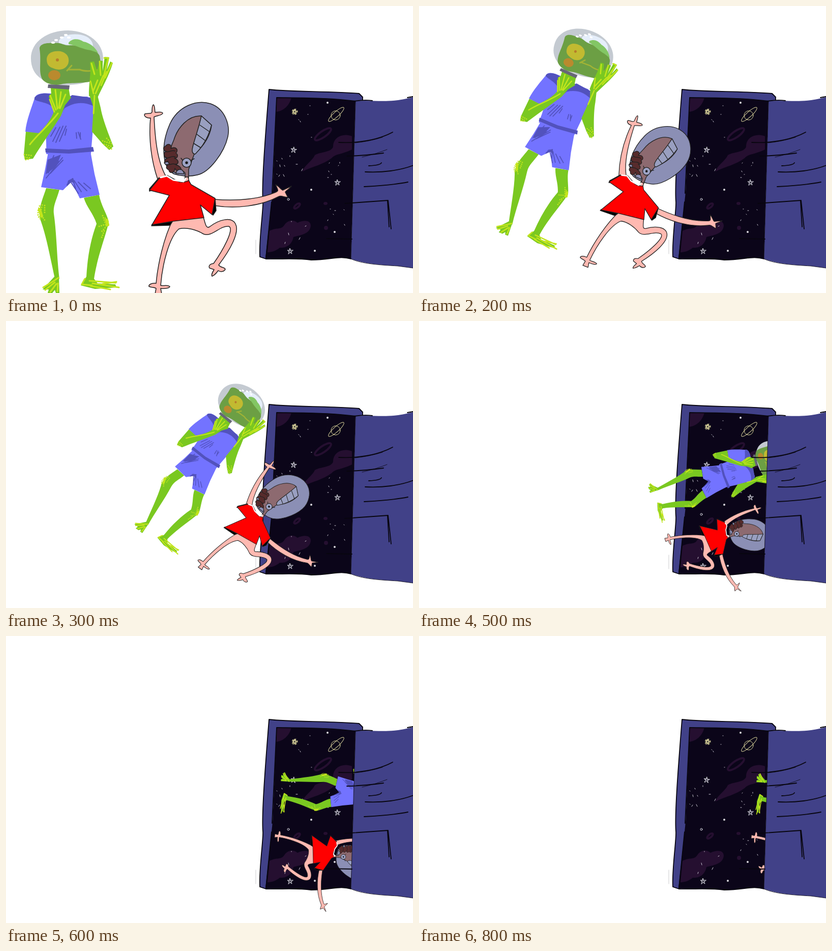
Write an HTML page that moves like this. It is 800 by 564 pixels and loops after 1000 ms.

```html
<!DOCTYPE html>
<html lang="en">
<head>
<meta charset="utf-8">
<title>Through the space door</title>
<style>
  html, body { margin: 0; width: 100%; height: 100%; overflow: hidden; background: #fff; }
  svg { display: block; width: 800px; height: 564px; }
  path, ellipse, circle { stroke-linecap: round; stroke-linejoin: round; }
  .line { fill: none; stroke: #08060f; stroke-width: 1.8; }
  .thin { stroke-width: .8; }
  .navy { fill: #414188; }
  .nebula { fill: #250f30; }
  .ring { fill: none; stroke: #250f30; stroke-width: 4; }
  .specks { fill: none; stroke: #cfcbd6; stroke-width: 1; }
  .star { fill: none; stroke: #dcdce4; stroke-width: 1; }
  .gold { stroke: #d8d29a; }
  .green { fill: #7ac821; }
  .lime { fill: none; stroke: #c3e51c; stroke-width: 3; }
  .dots { stroke-dasharray: 0 4.5; }
  .blue { fill: #7373ff; }
  .shade { fill: #5252bd; }
  .hatch { fill: none; stroke: #5252bd; stroke-width: 2; }
  #man > * { stroke: #222; stroke-width: 1.5; }
  .skin { fill: #ffb9b1; }
  .ink { fill: #000; }
  .open { fill: none; }
</style>
</head>
<body>
<svg viewBox="0 0 800 564">
  <defs>
    <path id="scribble" d="M-4 5L-1-6L3 5L-6-2L5-2Z"/>
    <clipPath id="outside"><path d="M0 0H687V187L678 497V564H0Z"/></clipPath>
  </defs>

  <g id="portal">
    <path class="navy" d="M517 164C560 169 640 167 694 172L701 179V185L687 190L532 184L524 372L511 497L499 493C497 460 506 400 505 385C502 350 511 240 517 164Z"/>
    <path fill="#0b0519" d="M532 180C580 182 620 178 687 187L678 497C655 490 640 499 600 499C570 495 540 498 510 496L522 385L524 365Z"/>
    <path class="nebula" d="M532 180H561C557 196 545 207 530 208Z"/>
    <path class="nebula" d="M583 325C585 314 603 304 607 293C620 286 638 288 643 277C642 256 666 249 680 256V282C660 292 648 290 640 299C622 312 604 315 583 325Z"/>
    <path class="nebula" d="M514 484L518 442C530 435 540 440 546 432C553 420 565 419 573 426C586 420 599 421 599 432C597 448 580 450 565 454C562 470 550 476 538 475C530 482 520 484 514 484Z"/>
    <g transform="rotate(-35 623 252)"><ellipse class="ring" cx="623" cy="252" rx="19" ry="6"/></g>
    <g transform="rotate(-40 572 393)"><ellipse class="ring" cx="572" cy="393" rx="7" ry="3"/></g>
    <ellipse class="nebula" cx="628" cy="388" rx="4" ry="3"/>
    <ellipse class="nebula" cx="629" cy="436" rx="4" ry="4"/>
    <path class="specks" d="M575 223l1 1M578 226l1 2M593 213h1M597 196h1M600 258h1M558 294v2M532 304l1 1M542 299l1 2M538 312l1 4M547 313l1 2M536 335l2-3M532 330l1 1M545 331l2 4M570 311l3 0M581 324l2-4M635 309l1-1M656 307v2M653 314l1-1M634 324l1 2M639 331h1M632 337l2 0M637 399h1M646 402h2M643 409l1 1M633 420l-1 2M665 429l1 2M590 432l-2 1M561 423v1M576 459l2-4M555 446l1 4M548 467l1-3M664 400l1 1"/>
    <use href="#scribble" class="star" x="566" y="283" transform="rotate(8 566 283)"/>
    <use href="#scribble" class="star" x="652" y="347"/>
    <use href="#scribble" class="star" x="559" y="482"/>
    <use href="#scribble" class="star gold" x="568" y="208"/>
    <use href="#scribble" class="star gold" x="568" y="208" transform="rotate(25 568 208)"/>
    <g class="star gold">
      <circle cx="648" cy="215" r="9"/>
      <ellipse cx="649" cy="213" rx="20" ry="5" transform="rotate(-42 649 213)"/>
    </g>
    <g fill="#d9d6dc">
      <circle cx="632" cy="190" r="2"/><circle cx="600" cy="361" r="2"/>
      <circle cx="646" cy="444" r="2"/><circle cx="607" cy="481" r="2"/>
    </g>
    <circle class="star" cx="555" cy="380" r="2"/>
    <path class="line" d="M701 185V179L694 172C640 167 560 169 517 164C511 240 502 350 505 385C506 400 497 460 499 493L511 497C540 498 570 495 600 499C640 499 655 490 678 497"/>
    <path class="line" d="M687 187C640 181 600 181 532 180L523 368M522 385L511 494"/>
    <path class="line thin" d="M491 460V487" opacity=".25"/>
  </g>

  <g clip-path="url(#outside)">
    <g id="alien">
      <path class="green" d="M79 358L105 361C100 380 92 392 94 408C100 450 100 500 105 536L97 540C88 500 80 455 69 424C60 404 72 380 79 358Z"/>
      <path class="green" d="M153 377L183 371C186 390 199 410 202 424C197 450 180 490 173 536L180 545L215 547L217 553L175 556L147 549L158 532C160 495 166 460 178 428C172 408 158 395 153 377Z"/>
      <path class="green" d="M95 532L104 533L105 564H98L96 558L91 564H82L84 557L72 557Z"/>
      <path class="lime" d="M103 534L91 542L73 553M96 543L77 558M99 546L87 562M102 545L101 561M155 536L149 547L169 549M164 540L216 544M170 545L222 553M166 550L205 557M190 546L217 542"/>
      <path class="lime dots" d="M66 393L63 402V413L69 420M71 391L68 404L72 415L77 422M195 417L201 425L194 437L186 445M190 412L196 429L183 433M76 392V410M193 442L188 455" stroke-width="5"/>
      <path class="lime" d="M66 400L70 413M198 421L200 430" style="stroke-width:6"/>

      <path class="green" d="M88 160H123L128 190H90Z"/>
      <path class="blue" d="M57 179C61 171 76 171 90 172L130 178L160 178L172 189L171 240L167 290L79 291C80 260 77 250 77 237L66 251L38 247C40 225 50 200 57 179Z"/>
      <path class="shade" d="M56 180C65 169 82 171 92 174L93 199C78 188 68 190 56 184Z"/>
      <path class="shade" d="M117 184L130 175L166 180L171 196C150 187 132 190 115 201L107 214Z"/>
      <path class="blue" d="M83 287L166 286L174 330L184 371L145 378L129 345L112 362L69 356L77 320Z"/>
      <path class="shade" d="M77 280L123 282L171 277L173 286L124 290L78 288Z"/>
      <path class="hatch" d="M92 266L106 238M98 268L112 236M105 266L118 236M88 256L98 239M116 254L119 242M138 249L139 260M142 248L147 262M146 249V260M83 328L103 295M79 338L111 298M87 329L112 303M80 325L94 294M92 322L104 305M120 351L131 339L137 359M126 344L142 368M134 343L148 365M142 346L159 363M153 348L166 359"/>
      <path class="shade" d="M82 302L108 292L99 315L78 331ZM122 343L132 338L135 348L128 346L119 355Z"/>

      <path d="M49 103C49 70 82 48 122 48C164 49 191 74 191 103C191 136 165 154 126 155C80 157 49 140 49 103Z" fill="#c4cad1"/>
      <path d="M104 68C112 55 140 52 158 60C170 66 173 78 170 84C150 78 130 80 104 73Z" fill="#e5eefa"/>
      <path d="M66 84C66 74 80 72 94 73C108 70 114 79 126 77L150 78C168 82 180 89 184 98C188 115 184 133 170 148C145 153 120 150 108 154C94 157 80 153 72 145C63 130 70 112 66 84Z" fill="#6c9f44"/>
      <path d="M123 72C132 62 144 65 152 70C165 72 176 82 181 92L166 87C150 85 140 78 123 75Z" fill="#83c664"/>
      <path d="M80 104C82 90 95 88 107 89C121 92 126 103 122 114C117 125 104 128 92 122C82 119 80 112 80 104Z" fill="#c2ba31"/>
      <circle cx="101" cy="106" r="3" fill="#b77d2a"/>
      <ellipse cx="95" cy="136" rx="12" ry="10" fill="#ba8a2e"/>
      <path class="lime" d="M120 127L129 117M122 125L145 125C155 129 168 128 179 126" style="stroke:#a3b435"/>
      <path d="M91 72h3M97 67h3M108 62h3M116 57h3M122 62h3" stroke="#fff" stroke-width="4"/>
      <path d="M83 154L125 156L124 164L82 161Z" fill="#676777"/>

      <path class="green" d="M39 247L66 250C76 237 90 222 94 207L84 178L95 164L107 168L121 170L128 180L116 195L108 216C88 247 70 272 53 300L37 302L35 292Z"/>
      <path class="lime" d="M47 272C65 249 85 234 102 211M98 204L87 176M101 202L97 165M104 200L108 169M106 201L117 174M95 208L86 184"/>
      <path class="lime dots" d="M36 292L52 294M37 297L50 299M39 302L46 301" stroke-width="5"/>

      <path class="green" d="M163 172L180 176L186 200C190 222 199 245 211 276L203 283L190 271L169 247L172 200Z"/>
      <path class="green" d="M165 110L173 109L179 128L184 107L190 108L190 128L194 100L203 101L198 126L205 109L210 112C202 138 190 158 180 180L163 177C162 155 168 132 165 110Z"/>
      <path class="lime" d="M168 113L174 134M184 109L186 136M193 102H201L192 138M208 112L195 141M166 148L172 172M191 137L176 172M180 146L171 168M198 129L187 156M174 176L172 211"/>
      <path class="lime dots" d="M190 265L208 271M193 272L209 276M199 277L208 281M198 260L205 267" stroke-width="5"/>
    </g>

    <g id="man">
      <path class="skin" d="M298 340C286 305 280 262 284 220C276 221 270 216 273 212C280 210 286 213 287 208C287 198 288 194 290 194C293 198 292 204 293 209C300 208 308 208 308 211C306 215 298 215 291 218C293 260 297 305 315 336Z"/>
      <path class="skin" d="M409 380C450 383 495 381 530 366C538 363 533 360 530 351C537 354 540 361 544 362L561 354C556 361 548 364 549 366L554 376C546 376 542 372 537 374C500 394 450 399 408 392Z"/>
      <path class="skin" d="M328 420C310 455 298 510 295 545C285 544 280 548 281 551C286 554 292 552 295 555L293 566H306L304 555C314 556 322 554 322 551C316 547 308 551 304 549C307 510 320 455 340 438C355 434 375 440 388 448C405 455 420 431 438 433C450 438 425 482 408 506C400 507 398 511 400 515L409 518C406 523 403 528 405 531C411 529 414 524 417 520C423 524 430 521 431 517C428 512 422 515 418 509C440 480 460 445 451 428C443 413 418 420 400 434C393 438 392 428 388 415Z"/>
      <path fill="#8b8fb5" d="M330 330C304 315 306 268 322 232C338 197 375 183 402 192C431 202 441 235 436 257C429 288 400 327 376 332C360 336 342 334 330 330Z"/>
      <path fill="#8d6a70" d="M384 216C358 214 337 240 330 263C320 285 315 312 327 324C340 335 347 319 352 328L352 338H359V321L370 291C390 275 402 253 404 234Z"/>
      <path fill="#999fc0" d="M384 216L404 234C398 258 387 276 372 291C366 291 365 285 367 277C371 260 379 240 384 216Z"/>
      <path class="open" d="M381 234L400 247M375 252L391 264M369 270L382 278"/>
      <path fill="#572b2c" stroke-width="1" d="M313 276C319 268 327 273 324 280C334 275 340 283 334 289C340 293 337 300 331 299C341 303 340 311 333 311C342 315 348 320 341 323C338 327 333 322 332 319C331 329 321 330 320 322C312 319 316 312 320 311C309 311 310 302 317 299C309 296 309 288 315 286C308 283 309 277 313 276Z"/>
      <path class="open" d="M312 284C318 291 326 281 332 285M312 297C319 303 325 292 333 297M315 310C323 315 326 306 336 313"/>
      <path fill="#8b8fb5" stroke-width="1" d="M334 329C335 320 348 317 350 330ZM311 308L318 305L321 311L314 312Z"/>
      <circle cx="355" cy="308" r="9" fill="#9da3c5"/>
      <circle cx="355" cy="308" r="2" class="ink"/>
      <path class="open" d="M347 303L344 299M364 303L370 300"/>
      <path class="skin" d="M352 336H358L361 350L350 348Z"/>
      <path class="ink" d="M301 337L282 359V364L292 359ZM287 429L286 432L322 431L327 424ZM411 379L413 402L407 411L402 406Z"/>
      <path fill="#f00" d="M301 339L282 362L321 372L287 430L328 423L389 416L382 391L405 410L411 378L364 351C360 346 360 341 357 344C352 346 344 348 337 344L317 333Z"/>
      <path d="M304 337L316 334L329 342L349 345L353 339" fill="none" style="stroke:#fff;stroke-width:3"/>
    </g>
  </g>

  <g id="door">
    <path class="navy" d="M687 187C720 183 750 193 800 179V515L770 511C735 509 705 507 678 497Z"/>
    <path class="line thin" d="M687 187L678 497C700 507 735 509 770 511L800 515"/>
    <path class="line" d="M684 187C697 185 707 184 720 186M789 180L800 178"/>
    <path class="line" d="M654 268C690 270 730 264 760 248M670 295Q708 294 742 289M713 314Q736 313 738 308M706 326C740 328 775 323 801 313M704 355Q760 352 790 346M666 388L751 382L757 438M750 384L753 434M630 457L680 458"/>
    <path class="line thin" d="M686 269Q715 266 740 258M700 297Q730 290 749 282"/>
  </g>
</svg>
<script>
  // Per 100 ms step: angle, scale, alien belt x y, man shirt x y
  const poses = [
    [0, 1, 125, 283, 350, 380],
    [9, .94, 141, 282, 336, 406],
    [20.6, .842, 274, 236, 422, 380],
    [36, .69, 393, 268, 485, 403],
    [51.6, .534, 513, 299, 548.5, 426],
    [73, .535, 601, 304, 587, 427],
    [95, .535, 689, 309, 625, 428],
    [95, .535, 751, 310, 688, 429],
    [95, .535, 812, 311, 750, 430],
  ];
  const alien = document.getElementById("alien");
  const man = document.getElementById("man");

  function place(figure, x, y, angle, scale, pivotX, pivotY) {
    figure.setAttribute("transform",
      `translate(${x} ${y}) rotate(${angle}) scale(${scale}) translate(${-pivotX} ${-pivotY})`);
  }

  function draw() {
    const step = Math.floor(performance.now() % 1000 / 100);
    const [angle, scale, ax, ay, mx, my] = poses[Math.min(step, poses.length - 1)];
    place(alien, ax, ay, angle, scale, 125, 283);
    place(man, mx, my, angle, scale, 350, 380);
    requestAnimationFrame(draw);
  }
  draw();
</script>
</body>
</html>
```
